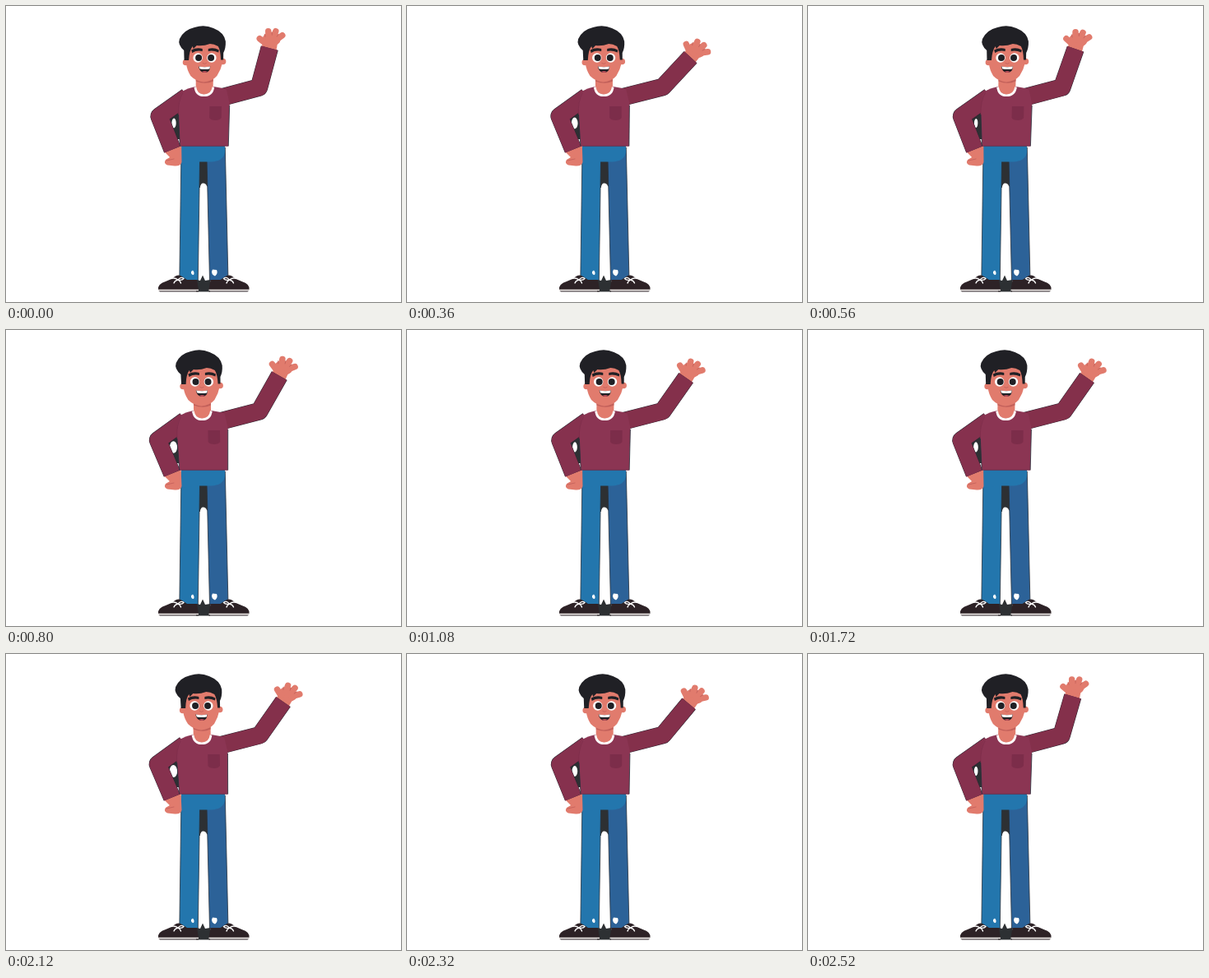
Write an HTML page that moves like this. It is 480 px wide and 360 px high and loops after 2560 ms.

```html
<!DOCTYPE html>
<html lang="en">
<head>
<meta charset="utf-8">
<title>Waving man</title>
<style>
  html, body { margin: 0; width: 100%; height: 100%; overflow: hidden; background: #fff; }
  svg { display: block; width: 100vw; height: 100vh; }
  .ink { fill: #202025; }
  .gap { fill: #2d3033; }
  .skin { fill: #e17b6d; }
  .limb { fill: none; stroke-width: 20.6; stroke-linejoin: round; }
  .rim { stroke: #2b2430; stroke-width: 21.6; }
  .edge { stroke: #27303c; stroke-width: .8; }
  .line { fill: none; stroke: #c2605a; stroke-width: .8; stroke-linecap: round; }
</style>
</head>
<body>
<svg viewBox="0 0 480 360">
  <defs>
    <g id="shoe">
      <path fill="#2d2226" d="M185 345Q184 338 194 335Q201 333 206 328.5Q210 326.5 214 329L220 333H232L234 345Z"/>
      <path fill="#eee9e7" d="M185 344.8H234V346.5H185Z"/>
      <path fill="#2d2226" d="M185.500 346.500H234V347.500H187Z"/>
      <path fill="none" stroke="#fff" stroke-width="1.300" stroke-linecap="round"
        d="M201 331.500Q205 330 209 333Q213 328.500 216 331.500Q214 334 209 333Q205 334 204 337M209 333Q212 335 212.500 337"/>
    </g>
  </defs>

  <!-- legs -->
  <path class="gap" d="M234 188H246V220L244 219Q243 215.500 239.500 215.500Q236.500 215.500 235.800 221H234.500Z"/>
  <path class="edge" fill="#2c6298" d="M244 186L266.300 172L270 334H247.500Z"/>
  <path class="edge" fill="#2376ad" d="M213 172L210.800 334H233.300L235.500 189Z"/>
  <path fill="#2376ad" d="M213 168H266V178Q264 189 249 189.500H235.200L213.200 192Z"/>
  <path class="gap" d="M231 333L236 334L239 327.500L242 334L248 333V347.500H231Z"/>
  <use href="#shoe"/>
  <use href="#shoe" transform="matrix(-1 0 0 1 480.5 0)"/>
  <path fill="#fff" d="M227 321.500Q229.500 324 228 327Q224.500 327 225 323Z
    M251 320.500L256 321Q258 325 254 328.500Q250 327 250 323Z"/>

  <!-- raised arm -->
  <g id="arm">
    <g id="hand">
      <path fill="none" stroke="#e17b6d" stroke-width="18" d="M-1 3L1-8"/>
      <ellipse class="skin" cx="2.500" cy="-11" rx="11" ry="8.500"/>
      <path fill="none" stroke="#e17b6d" stroke-width="7.500" stroke-linecap="round"
        d="M-5-6L-12-11.500M-1-11L-1.500-20.500M4-11L7.500-20.500M8-10L15.500-15.500"/>
      <path class="line" d="M-5-14L-6-17M3-16L3-19M9-14L11-17"/>
    </g>
    <path id="sleeveRim" class="limb rim"/>
    <path id="sleeve" class="limb" stroke="#84304b"/>
  </g>

  <!-- swaying upper body -->
  <g id="body">
    <path class="gap" d="M194 130L211 126L211 162H207Z"/>
    <ellipse id="hole" fill="#fff" cy="142.5"/>
    <path class="skin" d="M192 177L210 168L213 171L213.500 190Q212 195 205 194.500L196 193.500Q191 191 194 187L199 184Z"/>
    <path class="line" d="M195 188L204 186"/>
    <path class="limb rim" d="M219 110L185.500 134L202 174.500"/>
    <path class="limb" stroke="#86314e" d="M219 110L185.500 134L202 174.500"/>
    <path fill="#8b3553" d="M229 98Q219 100 213 104Q208.500 112 208.800 130L211 170.300H270L270.800 119L267 102Q260 99 251 98Z"/>
    <path fill="none" stroke="#7c2d49" stroke-width=".7" d="M214 105Q208 116 208.800 132"/>
    <path class="edge" fill="none" d="M208.800 132L211 170.300M270.800 121L270 170.300"/>
    <path fill="none" stroke="#682a45" stroke-width=".8" d="M211 170.300H270"/>
    <path fill="#7c2d4a" d="M246.500 122H261V136Q259 139 254 139Q248 139 246.500 136Z"/>
    <path class="skin" d="M229.500 86H250.500V101Q246 108 240 108Q233 107 229.500 101Z"/>
    <path fill="#c2605a" d="M229.500 89H250.500V91.500Q241 96 229.500 91.500Z"/>
    <path fill="none" stroke="#fff" stroke-width="2.600" d="M228.700 98.500Q230 108.800 239.500 108.800Q249.500 108.800 250.800 98.500"/>
    <!-- head -->
    <circle class="skin" cx="217" cy="68.500" r="3.800"/>
    <circle class="skin" cx="262" cy="67.500" r="3.800"/>
    <path class="skin" d="M217.500 43H261L261.500 69Q260 77 255 85Q249 92 239 92.500Q230 92 223 85Q218.500 78 217.500 70Z"/>
    <path class="ink" d="M215 66L214.500 54Q206.500 47 209 40Q214 29 227 26Q239 22 250 27Q263 32 265 43Q265.500 51 262.500 57V65.500H259.500Q259 54 256 49Q251 46 246 46Q238 49 230 48L226 52L225 49Q221 54 220.500 66Z"/>
    <path class="ink" d="M223.500 53.500Q230 50 237 52V55Q230 53.500 224.500 57ZM244 52Q251 50 257 53.500L256.500 56.500Q250 53.500 244 55Z"/>
    <g fill="#fff"><circle cx="231.500" cy="63" r="5.700"/><circle cx="248.300" cy="63" r="5.700"/></g>
    <g class="ink"><circle cx="232.500" cy="63" r="4"/><circle cx="247.500" cy="63" r="4"/></g>
    <path class="line" stroke-width="1.300" d="M237.500 69.500Q240 71.500 242 69.500"/>
    <path class="ink" d="M232.500 73.500Q240 75 246.800 73.500Q246.500 81 240 81Q234 81 232.500 73.500Z"/>
    <path fill="#fff" d="M233 73.500Q240 75 246.500 73.500L246 76.500Q240 77.500 234 76.500Z"/>
    <path fill="#b94c58" d="M236.500 80Q240 78 243.500 80Q240 82 236.500 80Z"/>
  </g>
</svg>
<script>
const LOOP = 2560, WAVE = 640, STEP = 40;
const el = id => document.getElementById(id);
const set = (id, attrs) => {
  for (const name in attrs) el(id).setAttribute(name, attrs[name]);
};

function draw(time) {
  const phase = Math.floor(time % LOOP / STEP) * STEP / WAVE * 2 * Math.PI;
  const wave = (1 - Math.cos(phase)) / 2;
  const sway = Math.cos(phase - 0.86 * 2 * Math.PI);

  // The upper body leans from the hips.
  const lean = 0.02 * sway;
  set('body', { transform: `matrix(1 0 ${-lean} 1 ${lean * 190} 0)` });
  set('hole', { cx: 203.8 - 0.6 * sway, rx: 3.5 - 1.3 * sway, ry: 6.6 - sway });

  // The forearm swings about the elbow, which moves a little too.
  const angle = 15 + 29 * wave, rad = angle * Math.PI / 180;
  const elbowX = 306.5 + 5 * wave, elbowY = 99 - 0.5 * wave;
  const cuffX = elbowX + 49.5 * Math.sin(rad), cuffY = elbowY - 49.5 * Math.cos(rad);
  const d = `M258 112L${elbowX} ${elbowY}L${cuffX} ${cuffY}`;
  set('arm', { transform: `translate(${1.5 * sway} 0)` });
  set('sleeve', { d });
  set('sleeveRim', { d });
  set('hand', { transform: `translate(${cuffX} ${cuffY}) rotate(${angle - 15})` });
}

function tick() {
  draw(performance.now());
  requestAnimationFrame(tick);
}
tick();
</script>
</body>
</html>
```
